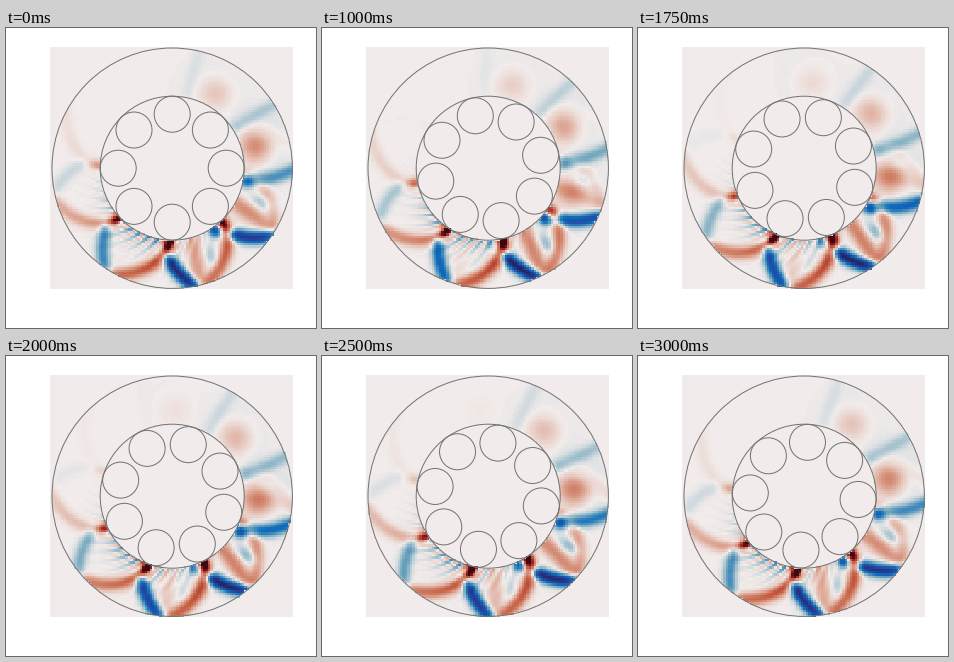
Animation of 310x300 px, one loop 3.25 s. Source, as a matplotlib script:

```python
import numpy as np
import matplotlib.pyplot as plt
from matplotlib.animation import FuncAnimation
from matplotlib.colors import LinearSegmentedColormap
from matplotlib.patches import Circle

W, H, DPI = 310, 300, 100
FRAMES, STEP = 13, 250
CX, CY = 166.2, 140.2
R_IN, R_OUT, R_ORBIT, R_BALL = 72, 120.2, 54, 18
N_BALLS = 8
PITCH = 360 / N_BALLS
BOX = (44, 287, 261, 19)
CELLS = 100

BALANCE = LinearSegmentedColormap.from_list("balance", [
    "#181c43", "#28409a", "#0f6fbe", "#7cabbf", "#f1eceb",
    "#db9f8b", "#c45c40", "#9e1c26", "#3c0912"], N=257)

# Polar coordinates of the cells inside the ring.
left, right, bottom, top = BOX
cell = (np.arange(CELLS) + .5) / CELLS
gx, gy = np.meshgrid(left + (right - left) * cell - CX,
                     CY - top - (bottom - top) * cell)
gr = np.hypot(gx, gy)
ring = (gr > R_IN) & (gr < R_OUT)
r = gr[ring]
theta = np.degrees(np.arctan2(gy, gx)[ring])
rho = (r - R_IN) / (R_OUT - R_IN)


def bell(x, mid, width):
    return np.exp(-((x - mid) / width) ** 2 / 2)


def ramp(x, start, end):
    t = np.clip((x - start) / (end - start), 0, 1)
    return t * t * (3 - 2 * t)


def ridge(angle, lag, bend, power, width):
    """Curve leaving the inner wall at `lag` and swinging by `bend` degrees."""
    off = np.radians(angle - lag - bend * rho ** power)
    slope = np.radians(bend) * power * rho ** (power - 1) * r / (R_OUT - R_IN)
    return bell(r * off / np.hypot(1, slope), 0, width)


def spot(angle, lag, depth, across, along):
    """Blob at `lag` degrees and relative depth; sizes in pixels."""
    return bell(r * np.radians(angle - lag), 0, across) * bell(rho, depth, along / 48)


def wake(p):
    """Stress around one ball, p pitches into its trip that starts upper left."""
    angle = (theta - 135 - PITCH * p + 200) % 360 - 200
    late = np.clip(p - 4, 0, 2)
    open_wall = 1 - late / 2 * (1 - ramp(rho, 0, .7))

    streak = .72 * bell(p, 3.4, 1.1) * (1 - .35 * rho) * open_wall
    u = streak * ridge(angle, -2.5 - 4 * late, -25, 1.7, 4.5)

    crest = .92 * bell(p, 3.4, 1.1) + .07 * ramp(p, 4, 6) * (1 - ramp(p, 6, 8))
    gap = .3 * (1 - ramp(p, 4, 5))
    u -= crest * ramp(rho, gap - .15, gap + .15) * ridge(
        angle, -6 - 3 * late, 17 - 9 * late, 1.5, 4.6)

    u += 1.05 * bell(p, 2.8, 1) * spot(angle, -2.5, .06, 3.2, 4.5)
    u -= .75 * bell(p, 4.2, .6) * spot(angle, -10, .08, 4.5, 5)
    u += .36 * bell(p, 4.5, .6) * ridge(angle, -29, -3, 1, 5.5)
    u -= .22 * bell(p, 4.6, .6) * spot(angle, -21, .5, 4.5, 9)

    cushion = .36 * ramp(p, 4.7, 5.7) * np.exp(-.9 * max(p - 5.9, 0))
    u += cushion * (1.15 * spot(angle, -30, .3, 12, 11)
                    - .25 * spot(angle, -28, .4, 22, 20))
    return u * ramp(p, 0, 1) * (1 - ramp(p, 7.3, 8))


def ripples(phase):
    """Fine spokes on the inner wall, densest in the loaded zone."""
    load = bell((theta - 245 + 180) % 360 - 180, 0, 27)
    wave = np.cos(np.radians(6 * N_BALLS * (theta - PITCH * phase + 22 * rho)))
    return load * np.exp(-rho / .2) * (.36 * wave - .12)


def field(i):
    phase = i / FRAMES
    img = np.zeros_like(gr)
    img[ring] = ripples(phase) + sum(wake(k + phase) for k in range(N_BALLS))
    return img


fig = plt.figure(figsize=(W / DPI, H / DPI), dpi=DPI, facecolor="white")
ax = fig.add_axes([0, 0, 1, 1])
ax.axis("off")
image = ax.imshow(field(0), cmap=BALANCE, vmin=-1, vmax=1, extent=BOX,
                  interpolation="nearest", aspect="auto")
ax.set_xlim(0, W)
ax.set_ylim(H, 0)


def outline(radius):
    return ax.add_patch(Circle((CX, CY), radius, fill=False, ec="0.45", lw=.72))


outline(R_OUT)
outline(R_IN)
balls = [outline(R_BALL) for _ in range(N_BALLS)]


def update(i):
    image.set_data(field(i))
    for k, ball in enumerate(balls):
        a = np.radians(PITCH * (k + i / FRAMES))
        ball.center = CX + R_ORBIT * np.cos(a), CY - R_ORBIT * np.sin(a)
    return [image, *balls]


anim = FuncAnimation(fig, update, frames=FRAMES, interval=STEP, repeat=True)
plt.show()
```
